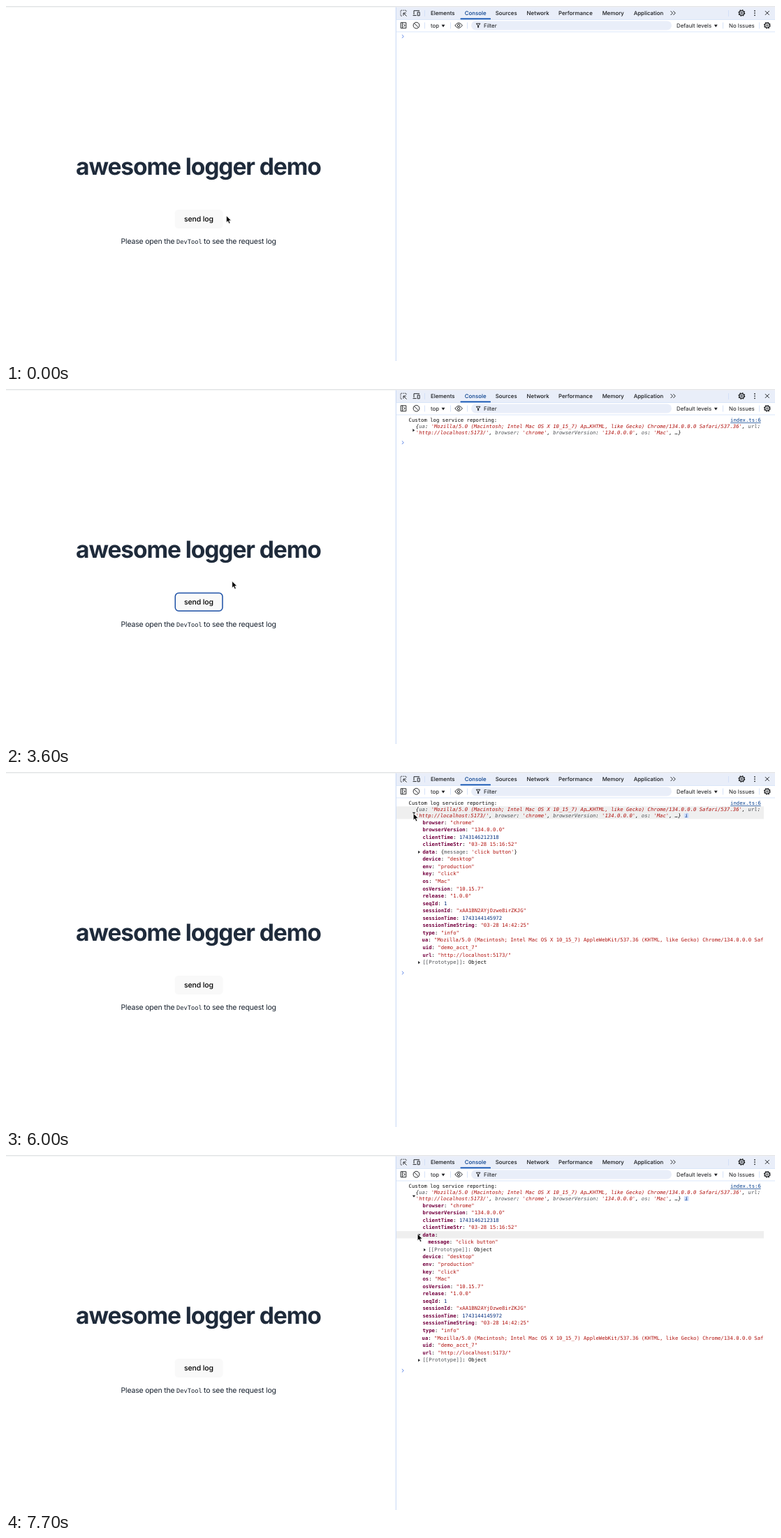
An HTML page for the animation above (8000 ms loop, 1101 by 509 pixels).

```html
<!DOCTYPE html>
<html lang="en">
<head>
<meta charset="utf-8">
<title>Logger demo</title>
<style>
  html, body { margin: 0; width: 100%; height: 100%; overflow: hidden; background: #fff; }
  svg { display: block; width: 1101px; height: 509px; }
  text { white-space: pre; text-rendering: geometricPrecision; font-optical-sizing: none; }
  .page { font-family: Inter, sans-serif; font-size: 10.5px; fill: #17212e; letter-spacing: -.018em; }
  .page .title { font-size: 33.6px; font-weight: 700; letter-spacing: -.033em; text-anchor: middle; fill: #1f2b3b; }
  .page .label { font-weight: 500; letter-spacing: -.012em; text-anchor: middle; fill: #000; }
  .page .code { font: 8.75px "DejaVu Sans Mono", monospace; letter-spacing: 0; }
  .bar { font: 500 7.87px Inter, sans-serif; fill: #15171a; }
  .bar .plain { font-weight: 400; }
  .bar .active { fill: #073f8c; }
  .icon { fill: none; stroke: #26282b; stroke-width: 1; }
  .solid { fill: #202124; stroke: none; }
  .sep { stroke: #cddcf6; stroke-width: .8; }
  .mono { font: 7.26px "DejaVu Sans Mono", monospace; fill: #0c0c0c; }
  .mono .key { font-weight: 700; fill: #74003f; }
  .mono .str { fill: #b0100c; }
  .mono .num { fill: #06307f; }
  .mono .dim { fill: #505357; }
  .mono .link { fill: #07408f; text-decoration: underline; }
  .preview { font-style: italic; }
</style>
</head>
<body>
<svg viewBox="0 0 1101 509">
  <defs>
    <clipPath id="consoleClip"><rect x="559" y="37" width="526" height="472"/></clipPath>
    <g id="gear" class="icon">
      <circle r="3.4" stroke-width="1.3"/>
      <circle r="4.3" stroke-width="1.3" stroke-dasharray="1.7 1.677"/>
      <circle r="1.2" stroke-width="1"/>
    </g>
    <path id="closed" class="solid" d="M-1.2-2.1 1.7 0-1.2 2.1z"/>
    <path id="opened" class="solid" d="M-2.1-1.2 0 1.7 2.1-1.2z"/>
    <path id="caret" class="solid" d="M-2.4-1.7H2.4L0 2z"/>
  </defs>

  <rect width="1101" height="509" fill="#fff"/>
  <rect width="1101" height="1.7" fill="#e6e7e9"/>

  <g class="page">
    <text class="title" x="275.4" y="242.3">awesome logger demo</text>
    <rect x="241.6" y="292" width="69" height="27" rx="5.3" fill="#f9f9f9"/>
    <rect id="ring" x="242.3" y="292.5" width="67.7" height="25.7" rx="5" fill="none" stroke="#1c50a6" stroke-width="1.5"/>
    <text class="label" x="276" y="309.2">send log</text>
    <text x="164.6" y="340.9">Please open the</text>
    <text class="code" x="244" y="340.9">DevTool</text>
    <text x="283" y="340.9">to see the request log</text>
  </g>

  <rect x="558" y="1.7" width="543" height="17.6" fill="#e9eef9"/>
  <rect x="559" y="19" width="542" height=".8" fill="#d3e1f9"/>
  <rect x="559" y="36.6" width="542" height=".8" fill="#d3e1f9"/>
  <rect x="557.8" y="1.7" width="1" height="508" fill="#c6d7f4"/>
  <rect x="650.5" y="17.6" width="43.5" height="1.6" rx=".6" fill="#0b4fb0"/>
  <rect x="666" y="21.4" width="287" height="13" rx="6.5" fill="#e9eef9"/>
  <g class="bar" id="bar">
    <text class="plain" x="608" y="30.7">top</text>
    <text class="plain" x="684" y="30.7">Filter</text>
    <text class="plain" x="960" y="30.7">Default levels</text>
    <text class="plain" x="1035" y="30.7">No Issues</text>
  </g>
  <path class="sep" d="M599.5 6v9M599.5 23.5v9M636.5 23.5v9M660.5 23.5v9M1034.5 6v9M1026.5 23.5v9M1078.5 23.5v9"/>

  <g class="icon">
    <path stroke-dasharray="1.4 1.2" d="M573 8V6.2H565V14.2H567.5"/>
    <path d="M569 13.8V10h3.8M569.2 10.2l4.4 4.4"/>
    <path d="M584 12.2V6.7h8M582.6 13.6h5M589.2 8.8h3v5h-3z"/>
    <path d="M951.6 7.2l2.9 2.9-2.9 2.9M955.4 7.2l2.9 2.9-2.9 2.9"/>
    <path d="M1086.9 7.1l5.8 5.8M1092.7 7.1l-5.8 5.8"/>
    <path d="M565.2 23.8h7.6v8h-7.6zM567.6 23.8v8M569.3 26l2 1.8-2 1.8"/>
    <circle cx="587.5" cy="27.8" r="4.4"/>
    <path d="M584.4 24.7l6.2 6.2"/>
    <path d="M642.8 27.9q5.3-7.4 10.6 0-5.3 7.4-10.6 0z"/>
    <circle cx="648.1" cy="27.9" r="1.7"/>
    <path d="M673.2 25.2h5.8L676.6 28v2.8h-1V28z"/>
  </g>
  <g class="solid">
    <circle cx="1072" cy="6.9" r=".9"/><circle cx="1072" cy="10.1" r=".9"/><circle cx="1072" cy="13.3" r=".9"/>
  </g>
  <use href="#gear" x="1053.3" y="10"/>
  <use href="#gear" x="1089.8" y="27.8"/>
  <use href="#caret" x="626" y="28.4"/>
  <use href="#caret" x="1016.3" y="28.4"/>

  <g class="mono" clip-path="url(#consoleClip)">
    <rect id="hover" x="559" width="526" fill="#efefef"/>
    <g id="log"></g>
    <g id="tree">
      <g id="head"></g>
      <g id="dataClosed"></g>
      <g id="dataOpen"></g>
      <g id="tail"></g>
    </g>
  </g>
  <path id="prompt" d="M-1.3-2.3 1.1 0-1.3 2.3" fill="none" stroke="#5f87e6" stroke-width="1"/>

  <g id="cursor">
    <path id="arrow" d="M0 0V9.6L2.2 7.6 3.8 11.3 5.6 10.5 4 6.9H7z" fill="#000" stroke="#fff" stroke-width=".7"/>
    <path id="hand" fill="#fff" stroke="#111" stroke-width=".9" stroke-linejoin="round"
      d="M-1.2.7C-1.4-.8.8-.8 1 .7L1.4 4Q2.9 3.2 3.4 4.5 4.8 3.8 5.2 5.1 6.7 4.8 6.9 6.2V8.3Q6.9 10 5.7 11.8H.6Q-1.2 9.6-2.9 7.6-2.9 6 -1.5 6.4L-.3 7.3z"/>
  </g>
</svg>

<script>
const LOOP = 8000, STEP = 100;
const PITCH = 10.556, FIRST_ROW = 72, DATA_ROW = 4;
const SHIFT = 2 * PITCH;
const TIMES = { focus: 1700, log: 2600, expand: 4800, data: 7400 };
const AGENT = 'Mozilla/5.0 (Macintosh; Intel Mac OS X 10_15_7) ';

const $ = id => document.getElementById(id);
const rowY = i => FIRST_ROW + i * PITCH;

function make(parent, tag, attrs, content) {
  const el = document.createElementNS('http://www.w3.org/2000/svg', tag);
  for (const name in attrs) el.setAttribute(name, attrs[name]);
  if (content) el.textContent = content;
  parent.append(el);
  return el;
}

// Each part is [class, text]; y is the middle of the line.
function line(parent, x, y, parts, cls = '') {
  const text = make(parent, 'text', { x, y: y + 2.5, class: cls });
  parts.forEach(([name, content]) => make(text, 'tspan', { class: name }, content));
}

const marker = (parent, type, x, y) => make(parent, 'use', { href: '#' + type, x, y });

const str = s => ['str', `"${s}"`];
const num = n => ['num', String(n)];
const field = (key, ...value) => [['key', key], ['', ': '], ...value];
const PROTO = [['dim', '[[Prototype]]'], ['', ': Object']];

// Tabs
const tabs = { Elements: 608, Console: 656.7, Sources: 700.8, Network: 745.6, Performance: 791, Memory: 853.7, Application: 898.7 };
for (const name in tabs)
  make($('bar'), 'text', { x: tabs[name], y: 13.4, class: name === 'Console' ? 'active' : '' }, name);

// Log message with its object preview
line($('log'), 576.6, 44.8, [['', 'Custom log service reporting:']]);
line($('log'), 1037.1, 44.8, [['link', 'index.ts:6']]);
line($('log'), 586.8, 53.5, [
  ['', '{'], ['dim', 'ua'], ['', ': '],
  ['str', `'${AGENT}Ap…KHTML, like Gecko) Chrome/134.0.0.0 Safari/537.36'`],
  ['', ', '], ['dim', 'url'], ['', ':']
], 'preview');
line($('log'), 586.8, 62.3, [
  ['str', "'http://localhost:5173/'"], ['', ', '],
  ['dim', 'browser'], ['', ': '], ['str', "'chrome'"], ['', ', '],
  ['dim', 'browserVersion'], ['', ': '], ['str', "'134.0.0.0'"], ['', ', '],
  ['dim', 'os'], ['', ': '], ['str', "'Mac'"], ['', ', …}']
], 'preview');
const logClosed = marker($('log'), 'closed', 583.5, 59.2);

// Expanded object
marker($('tree'), 'opened', 584, 59);
make($('tree'), 'rect', { x: 970.8, y: 58.9, width: 6.8, height: 7, rx: 1.2, fill: '#cfdffb' });
line($('tree'), 972.1, 62.4, [['num', 'i']], 'preview');

const head = [
  field('browser', str('chrome')),
  field('browserVersion', str('134.0.0.0')),
  field('clientTime', num(1743146212318)),
  field('clientTimeStr', str('03-28 15:16:52'))
];
const tail = [
  field('device', str('desktop')),
  field('env', str('production')),
  field('key', str('click')),
  field('os', str('Mac')),
  field('osVersion', str('10.15.7')),
  field('release', str('1.0.0')),
  field('seqId', num(1)),
  field('sessionId', str('xAA1BN2AYjOzwe8irZKJG')),
  field('sessionTime', num(1743144145972)),
  field('sessionTimeString', str('03-28 14:42:25')),
  field('type', str('info')),
  field('ua', str(AGENT + 'AppleWebKit/537.36 (KHTML, like Gecko) Chrome/134.0.0.0 Safari/537.36')),
  field('uid', str('demo_acct_7')),
  field('url', str('http://localhost:5173/')),
  PROTO
];
head.forEach((parts, i) => line($('head'), 596.5, rowY(i), parts));
tail.forEach((parts, i) => line($('tail'), parts[0][1] === 'ua' ? 595.6 : 596.5, rowY(DATA_ROW + 1 + i), parts));
marker($('tail'), 'closed', 591.3, rowY(DATA_ROW + tail.length) + .6);

line($('dataClosed'), 596.5, rowY(DATA_ROW),
  field('data', ['', '{'], ['dim', 'message'], ['', ': '], ['str', "'click button'"], ['', '}']));
marker($('dataClosed'), 'closed', 591.3, rowY(DATA_ROW) + .6);

line($('dataOpen'), 596.5, rowY(DATA_ROW), [['key', 'data'], ['', ':']]);
marker($('dataOpen'), 'opened', 591.5, rowY(DATA_ROW) + .4);
line($('dataOpen'), 604.2, rowY(DATA_ROW + 1), field('message', str('click button')));
line($('dataOpen'), 604.5, rowY(DATA_ROW + 2), PROTO);
marker($('dataOpen'), 'closed', 599.3, rowY(DATA_ROW + 2) + .6);

// Pointer path: time, x, y
const path = [
  [0, 315.5, 300.8], [100, 315.5, 300.8], [900, 285, 306], [1100, 294, 303.4],
  [1400, 294, 303.4], [1800, 286.5, 305.6], [3400, 286.5, 305.6],
  [4300, 581.5, 67.8], [4400, 581.5, 67.8], [4700, 583.2, 59.4],
  [6400, 583.2, 59.4], [6700, 587.6, 112], [7300, 587.6, 112],
  [7400, 589.2, 113.2], [LOOP, 589.2, 113.2]
];

function pointerAt(t) {
  const i = path.findIndex(p => p[0] > t);
  const [t0, x0, y0] = path[i - 1], [t1, x1, y1] = path[i];
  const p = (t - t0) / (t1 - t0), k = p * p * (3 - 2 * p);
  return [x0 + (x1 - x0) * k, y0 + (y1 - y0) * k];
}

const show = (el, on) => el.setAttribute('visibility', on ? 'visible' : 'hidden');
const shift = (el, x, y) => el.setAttribute('transform', `translate(${x} ${y})`);

function hoverBox(x, y, hasLog, isTree) {
  if (!hasLog || x < 559) return null;
  if (y > 49.3 && y < 67.4) return [49.3, 18.1];
  const row = Math.round((y - FIRST_ROW) / PITCH);
  return isTree && row >= 0 ? [rowY(row) - 5.1, 10.4] : null;
}

function render(t) {
  const hasLog = t >= TIMES.log, isTree = t >= TIMES.expand, isData = t >= TIMES.data;
  const [x, y] = pointerAt(t);
  const onButton = x > 241 && x < 311 && y > 292 && y < 319;

  shift($('cursor'), x, y);
  show($('hand'), onButton);
  show($('arrow'), !onButton);
  show($('ring'), t >= TIMES.focus && !isTree);

  show($('log'), hasLog);
  show(logClosed, hasLog && !isTree);
  show($('tree'), isTree);
  show($('dataClosed'), isTree && !isData);
  show($('dataOpen'), isData);
  shift($('tail'), 0, isData ? SHIFT : 0);
  shift($('prompt'), 568.2, isTree ? 288 + (isData ? SHIFT : 0) : hasLog ? 76.8 : 43.6);

  const box = hoverBox(x, y, hasLog, isTree);
  show($('hover'), box);
  if (box) {
    $('hover').setAttribute('y', box[0]);
    $('hover').setAttribute('height', box[1]);
  }
}

const start = performance.now();
function tick() {
  const t = (performance.now() - start) % LOOP;
  render(Math.floor(t / STEP) * STEP);
  requestAnimationFrame(tick);
}
tick();
</script>
</body>
</html>
```
